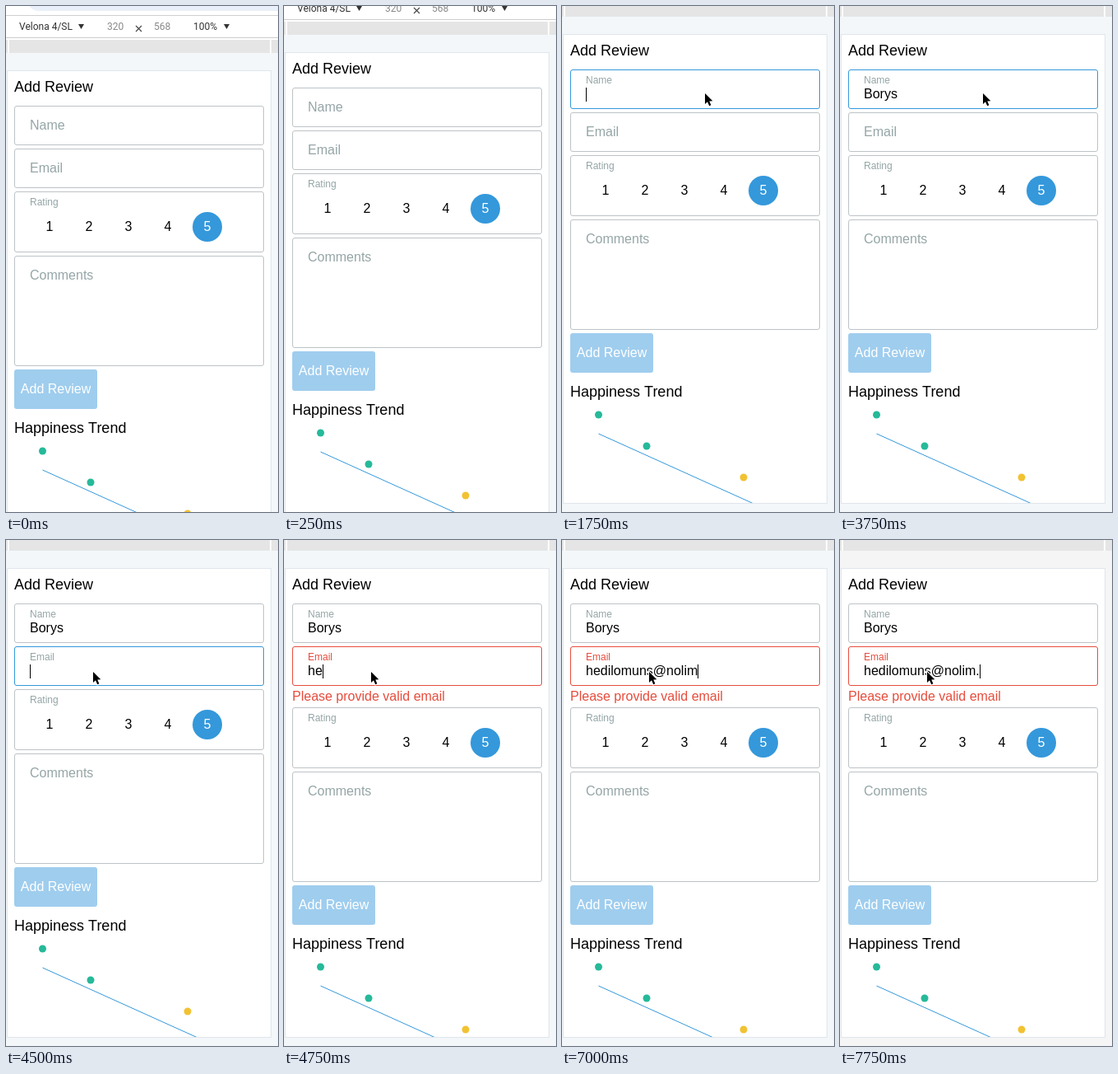
Animation of 331x614 px, one loop 8000 ms. Source, as an HTML page with a canvas:

```html
<!DOCTYPE html>
<html lang="en">
<head>
<meta charset="utf-8">
<title>Add Review</title>
<style>
  html, body { margin: 0; width: 100%; height: 100%; overflow: hidden; }
  canvas { display: block; }
</style>
</head>
<body>
<canvas id="stage" width="331" height="614"></canvas>
<script>
const ctx = document.getElementById('stage').getContext('2d');
const LOOP = 8000;
const NAME = 'Borys';
const EMAIL = 'hedilomuns@nolim.';
const BLUE = '#3498db', RED = '#e74c3c', GRAY = '#95a5a6', BORDER = '#bdc3c7';
const GREEN = '#26b99a', YELLOW = '#f1c232';

// Stepped timelines: [start in ms, value]
const PAN = [[0, 44], [250, 22], [500, 0]];
const POINTER = [[0, null], [500, [289, 197]], [750, [226, 148]], [1000, [174, 106]],
                 [4000, [136, 136]], [4250, [106, 160]]];
const FOCUS = [[0, ''], [1750, 'name'], [4500, 'email']];
const CARET = [[0, false], [1750, true], [2250, false], [2750, true], [3750, false],
               [4500, true], [7500, false], [7750, true]];
const NAME_LENGTH = [[0, 0], [2750, 2], [3000, 4], [3250, 5]];
const EMAIL_LENGTH = [[0, 0], [4750, 2], [5000, 3], [5250, 5], [5500, 7], [5750, 9], [6000, 10],
                      [6250, 11], [6500, 13], [6750, 15], [7000, 16], [7750, 17]];
const BACKDROP = [[0, '#f3f7fa'], [7500, '#f5f5f5']];

const at = (timeline, t) => timeline.filter(([start]) => start <= t).pop()[1];

function rect(x, y, w, h, color) {
  ctx.fillStyle = color;
  ctx.fillRect(x, y, w, h);
}

function text(str, x, y, size, color, align = 'left', family = '"Liberation Sans", Arial, sans-serif') {
  ctx.font = `${size}px ${family}`;
  ctx.textAlign = align;
  ctx.fillStyle = color;
  ctx.fillText(str, x, y);
}

function dot(x, y, r, color) {
  ctx.fillStyle = color;
  ctx.beginPath();
  ctx.arc(x, y, r, 0, 2 * Math.PI);
  ctx.fill();
}

function polygon(points, fill, stroke) {
  ctx.beginPath();
  points.forEach(([x, y]) => ctx.lineTo(x, y));
  ctx.closePath();
  if (stroke) {
    ctx.strokeStyle = stroke;
    ctx.lineWidth = 2;
    ctx.stroke();
  }
  ctx.fillStyle = fill;
  ctx.fill();
}

function box(y, h, color = BORDER) {
  ctx.strokeStyle = color;
  ctx.lineWidth = 1;
  ctx.beginPath();
  ctx.roundRect(10.5, y + .5, 303, h - 1, 2.5);
  ctx.stroke();
}

function field(label, y, value, focused, caret, invalid) {
  box(y, 48, invalid ? RED : focused ? BLUE : BORDER);
  if (!focused && !value) return text(label, 29, y + 29, 16, GRAY);
  text(label, 29, y + 17, 12, invalid ? RED : GRAY);
  text(value, 29, y + 35, 16, '#000');
  if (focused && caret) rect(Math.round(29 + ctx.measureText(value).width), y + 22, 1, 17, '#000');
}

function toolbar() {
  const label = (str, x, color) => text(str, x, -15, 12, color, 'left', 'Roboto, sans-serif');
  const arrow = x => polygon([[x, -22], [x + 7, -22], [x + 3.5, -16]], '#333');
  rect(0, -44, 331, 41, '#fff');
  ctx.fillStyle = '#e9f0f9';
  ctx.beginPath();
  ctx.roundRect(26, -70, 330, 32, 14);
  ctx.fill();
  rect(0, -33, 331, 1, '#d0d0d0');
  label('Velona 4/SL', 16, '#333');
  arrow(88);
  label('320', 123, '#888');
  label('568', 180, '#888');
  label('100%', 228, '#333');
  arrow(265);
  ctx.strokeStyle = '#444';
  ctx.lineWidth = 1.1;
  ctx.beginPath();
  ctx.moveTo(158, -20); ctx.lineTo(165, -13);
  ctx.moveTo(165, -20); ctx.lineTo(158, -13);
  ctx.stroke();
  rect(0, -6, 331, 1, '#ccc');
  rect(0, -3, 331, 16, '#e5e5e5');
  rect(2, -3, 2, 16, '#fff');
  rect(321, -3, 2, 16, '#fff');
}

function lowerForm() {
  box(181, 74);
  text('Rating', 29, 198, 12, GRAY);
  dot(245, 224, 18, BLUE);
  for (let n = 1; n <= 5; n++) text(n, 5 + 48 * n, 229, 16, n === 5 ? '#fff' : '#000', 'center');

  box(259, 134);
  text('Comments', 29, 288, 16, GRAY);

  ctx.fillStyle = '#9fcdee';
  ctx.beginPath();
  ctx.roundRect(10, 397, 101, 48, 3);
  ctx.fill();
  text('Add Review', 60.5, 426, 16, '#fff', 'center');

  text('Happiness Trend', 10, 474, 18, '#000');
  ctx.strokeStyle = BLUE;
  ctx.lineWidth = 1;
  ctx.beginPath();
  ctx.moveTo(44.5, 519);
  ctx.lineTo(244.5, 609);
  ctx.stroke();
  dot(44.5, 496, 4.5, GREEN);
  dot(103, 534, 4.5, GREEN);
  dot(221, 572, 4.5, YELLOW);
}

function card(t) {
  const focus = at(FOCUS, t), caret = at(CARET, t);
  const email = EMAIL.slice(0, at(EMAIL_LENGTH, t));
  const invalid = email !== '';

  ctx.save();
  ctx.beginPath();
  ctx.rect(1, 34, 322, 570);
  ctx.clip();
  rect(1, 34, 322, 570, '#dfe6ec');
  rect(2, 35, 320, 568, '#fff');
  ctx.beginPath();
  ctx.rect(2, 35, 320, 568);
  ctx.clip();

  text('Add Review', 10, 60, 18, '#000');
  field('Name', 77, NAME.slice(0, at(NAME_LENGTH, t)), focus === 'name', caret);
  field('Email', 129, email, focus === 'email', caret, invalid);
  if (invalid) {
    text('Please provide valid email', 10, 195, 16, RED);
    ctx.translate(0, 22);
  }
  lowerForm();
  ctx.restore();
}

function pointer([x, y]) {
  const outline = [[0, 0], [0, 13], [3, 10.3], [5.2, 15.3], [7.4, 14.3], [5.3, 9.5], [9.3, 9.3]];
  polygon(outline.map(([dx, dy]) => [x + dx, y + dy]), '#000', '#fff');
}

function draw() {
  const t = performance.now() % LOOP;
  const position = at(POINTER, t);
  rect(0, 0, 331, 614, at(BACKDROP, t));
  ctx.save();
  ctx.translate(0, at(PAN, t));
  toolbar();
  card(t);
  ctx.restore();
  if (position) pointer(position);
  requestAnimationFrame(draw);
}
requestAnimationFrame(draw);
</script>
</body>
</html>
```
